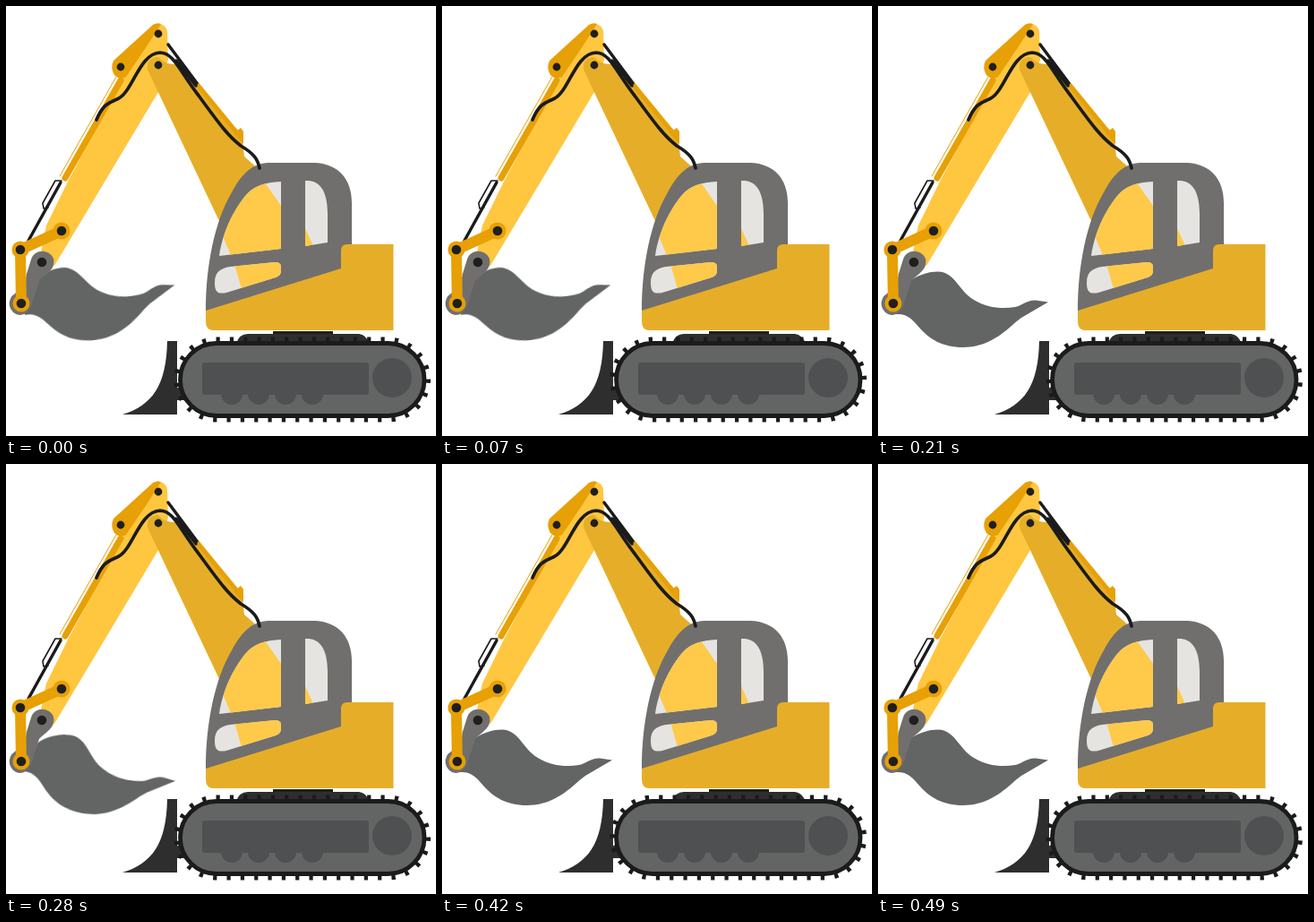
Animation, 480 px wide and 480 px high, one loop 560 ms. Source, as an HTML page:

```html
<!DOCTYPE html>
<html lang="en">
<head>
<meta charset="utf-8">
<title>Excavator</title>
<style>
  html, body { margin: 0; width: 100%; height: 100%; overflow: hidden; background: #fff; }
  svg { display: block; width: 100vw; height: 100vh; }
  .gold { fill: #e6ae28; }
  .sun { fill: #ffc640; }
  .amber { fill: #e7a005; }
  .iron { fill: #716f6d; }
  .steel { fill: #636564; }
  .coal { fill: #2e2e2e; }
  .slate { fill: #4f5052; }
  .glass { fill: #e6e4e0; }
  .pin { fill: #1f1f1d; }
  .line { fill: none; stroke: #1b1b1b; stroke-linecap: round; stroke-linejoin: round; }
  .rod { fill: none; stroke: #e7a005; stroke-linecap: round; }
  #bucket { transform-origin: 27px 336px; }
</style>
</head>
<body>
<svg viewBox="0 0 480 480">
  <defs>
    <clipPath id="panes">
      <path d="M238 279C242 250 257 223 269 210Q280 197 307 196V271Z"/>
      <path d="M334 195C348 194 359 203 359 232V264L334 268Z"/>
      <path d="M233 309C233 297 239 293 250 291L300 286Q307 286 307 291V296Q307 301 301 303L246 320C236 322 233 319 233 309Z"/>
    </clipPath>
  </defs>

  <!-- stick -->
  <path class="sun" d="M164 21Q177 17 180 28L181 60L170 96L54 290L38 280L45 245L70 194L130 82Z"/>
  <path class="amber" d="M120 61L164 21Q169 18 173 20L157 45L134 79Q127 83 121 77Q116 69 120 61Z"/>
  <path class="rod" d="M128 83L66 192" stroke-width="7"/>
  <path class="rod" d="M123 79L60 190" stroke-width="1"/>
  <path class="line" d="M61 197L25 262" stroke-width="3.5"/>
  <path class="line" d="M62 195L55 195L41 220L42 226L47 225" stroke-width="1.6"/>

  <!-- boom -->
  <path class="gold" d="M158 71Q157 57 170 57Q176 65 189 65L258 138L264 150L266 168L283 183L262 295L238 240Z"/>
  <path class="rod" d="M214 88L259 143" stroke-width="5"/>
  <path class="amber" d="M254 142L262 136L265 140V154Z"/>
  <path class="line" d="M181 43L213 86M190 61L212 89" stroke-width="3.5"/>

  <!-- bucket and linkage -->
  <path id="bucket" class="steel" d="M20 340L32 310C42 301 55 296.5 67 296.5C86 297 90 318 107 328C122 337 138 338.5 153 336C162 334 166 328 176 328.5L190 330.5L160 348Q153 353 148 358C134 370 118 381 95 381C71 381 57 371 47 360C38 349 32 343 20 344Z"/>
  <path class="iron" d="M28 283C32 271 48 271 53 282C56 295 43 300 37 307L28 335Q23 345 15 345A13 13 0 0 1 10 321Q22 312 23 299Z"/>
  <path class="rod" d="M17 332L16 272L62 251" stroke-width="12"/>
  <g id="knuckles" class="amber"></g>
  <g id="pins" class="pin"></g>

  <!-- cab -->
  <path class="iron" d="M223 340C223 290 233 240 252 208C264 186 275 176 293 175H344C371 176 386 193 386 220V270L376 297L224 344Z"/>
  <g clip-path="url(#panes)">
    <path class="glass" d="M220 180H370V330H220Z"/>
    <path fill="#ffc94a" d="M220 200L284 190L307 223L334 248L344 270L320 330H267L255 288L240 252Z"/>
  </g>
  <path class="gold" d="M223 340L374 293V273Q374 266 381 266H432.500V362H230Q223 361 223 352Z"/>
  <path class="line" stroke-width="3.7" d="M101 127C109 108 116 108 126 103C142 94 149 53 172 52C187 52 194 73 215 100C239 133 248 145 262 156C277 165 281 171 283 181"/>

  <!-- undercarriage -->
  <path class="pin" d="M298 363H365V371H298Z"/>
  <path class="coal" d="M257 377Q260 366 270 366H394Q402 367 406 377Z"/>
  <path class="coal" d="M180 374H191V456H130C163 446 179 424 180 374ZM190 427L202 420V440H190Z"/>
  <path id="teeth" class="line" style="stroke-linecap:butt" stroke-width="7" pathLength="172" stroke-dasharray="1.1 2.9"
    d="M235 461H426.500A44 44 0 0 0 426.500 373H235A44 44 0 0 0 235 461Z"/>
  <rect class="steel" x="194.500" y="376.500" width="272.500" height="81" rx="40.500" stroke="#1b1b1b" stroke-width="4.800"/>
  <rect class="slate" x="219" y="398" width="186" height="36" rx="3"/>
  <g id="wheels" class="slate"></g>
</svg>
<script>
  const LOOP = 560;
  const byId = id => document.getElementById(id);

  function addCircles(id, r, points) {
    for (const [cx, cy] of points) {
      const dot = document.createElementNS("http://www.w3.org/2000/svg", "circle");
      Object.entries({ cx, cy, r }).forEach(([key, value]) => dot.setAttribute(key, value));
      byId(id).append(dot);
    }
  }

  function hold(id, duration, frames) {
    const keys = frames.map((frame, i) => ({ ...frame, offset: i / frames.length, easing: "step-end" }));
    keys.push({ ...frames[0], offset: 1 });
    byId(id).animate(keys, { duration, iterations: Infinity });
  }

  const joints = [[16, 272], [17, 332], [62, 251]];
  addCircles("knuckles", 9.5, joints);
  addCircles("pins", 5.3, [...joints, [40, 286]]);
  addCircles("pins", 4.4, [[128, 68], [170, 31], [170, 66]]);
  addCircles("wheels", 12, [252, 282, 312, 342].map(x => [x, 433]));
  addCircles("wheels", 22, [[431, 415]]);

  hold("bucket", LOOP, [-6.7, 0, 8.2, 0].map(deg => ({ transform: `rotate(${deg}deg)` })));
  // The tread moves a quarter of a tooth gap per step.
  hold("teeth", LOOP / 2, [0, 1, 2, 3].map(step => ({ strokeDashoffset: `${1 - step}px` })));
</script>
</body>
</html>
```
